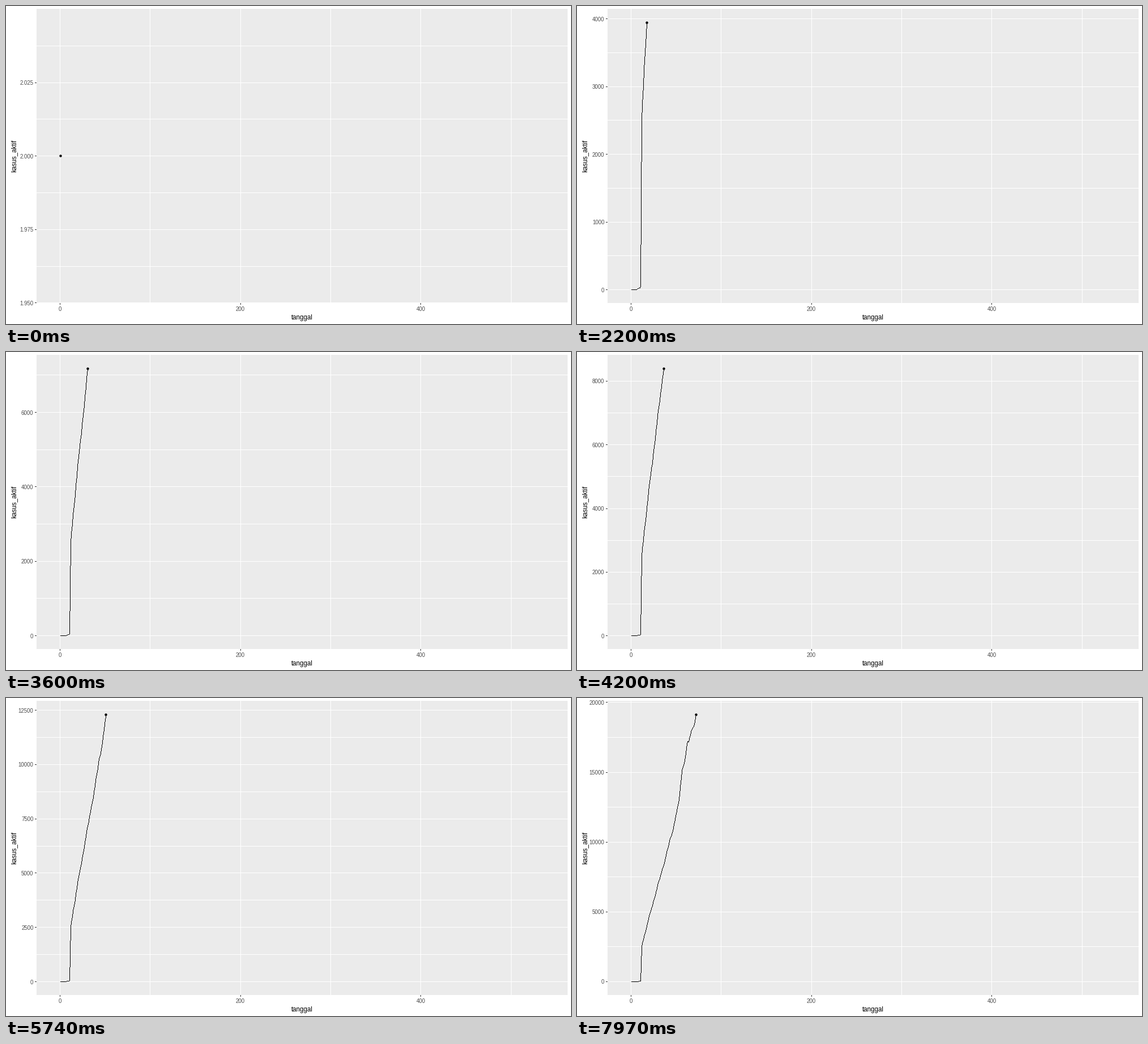
A matplotlib script that plays this animation: 998 by 561 pixels, repeating every 8000 ms.

```python
import math

import matplotlib.pyplot as plt
import numpy as np
from matplotlib.animation import FuncAnimation
from matplotlib.collections import LineCollection
from matplotlib.patches import Circle, Rectangle

W, H, DPI = 998, 561, 64
PX = 72 / DPI                                  # points per pixel
LEFT, RIGHT, TOP, BOTTOM = 54, 992.5, 5.5, 524
TICK_MS, LOOP_MS, HOLD_MS = 20, 8000, 500
LAST_DAY, STEPS = 536, 1679                    # full reveal covers all days

# Turning points of the curve as (day, cases)
TURNS = [(1, 2), (4, 2), (5, 4), (7, 6), (9, 27), (10, 27), (11, 60),
         (12, 2494), (16, 3509), (22, 5082), (24, 5423), (31, 7180),
         (37, 8471), (44, 10361), (45, 10393), (53, 12808), (57, 15145),
         (60, 15870), (63, 17204), (64, 17185), (68, 18129), (70, 18308),
         (73, 19246)]
DAYS = np.arange(1, TURNS[-1][0] + 1)
CASES = np.interp(DAYS, *zip(*TURNS))
KEYS = np.round((DAYS - 1) * STEPS / (LAST_DAY - 1))   # step of each day


def expand(lo, hi):
    pad = 0.05 * (hi - lo) if hi > lo else 0.05
    return lo - pad, hi + pad


def scaled(value, limits, start, end):
    lo, hi = limits
    return start + (value - lo) / (hi - lo) * (end - start)


def pixel(v):
    """Centre of the pixel that holds v."""
    return np.floor(v) + 0.5


def nice_breaks(lo, hi, m=5):
    """Extended Wilkinson labelling: first multiple, step and label count."""
    best, found = -9, None
    span = hi - lo
    for i, q in enumerate((1, 5, 2, 2.5, 4, 3)):
        for k in range(2, 11):
            z0 = math.ceil(math.log10(span / (k + 1) / q))
            for z in (z0, z0 + 1):
                step = q * 10.0 ** z
                first = math.floor(hi / step) - (k - 1)
                for start in range(first, math.ceil(lo / step) + 1):
                    a, b = start * step, (start + k - 1) * step
                    simple = (a <= 0 <= b) - i / 5
                    cover = 1 - 0.5 * ((hi - b) ** 2 + (lo - a) ** 2) / (0.1 * span) ** 2
                    ratio = (k - 1) / (b - a) * (max(b, hi) - min(a, lo)) / (m - 1)
                    dense = 2 - max(ratio, 1 / ratio)
                    score = 0.25 * simple + 0.2 * cover + 0.5 * dense + 0.05
                    if score > best + 1e-9:
                        best, found = score, (start, step, k)
    return found


def inside(values, lo, hi):
    eps = 1e-9 * max(1, abs(hi))
    return [v for v in values if lo - eps <= v < hi - eps]


def decimals(values):
    for n in range(6):
        if np.allclose(np.round(values, n), values, rtol=0, atol=1e-9):
            return n
    return 6


def pixel_run(xs, ys):
    """One-pixel strokes that trace a polyline without smoothing."""
    px, py = [], []
    for x0, y0, x1, y1 in zip(xs, ys, xs[1:], ys[1:]):
        n = int(max(abs(x1 - x0), abs(y1 - y0))) + 1
        px.append(np.linspace(x0, x1, n))
        py.append(np.linspace(y0, y1, n))
    if not px:
        return []
    x, y = pixel(np.concatenate(px)), pixel(np.concatenate(py))
    return np.stack([np.column_stack([x, y - 0.5]),
                     np.column_stack([x, y + 0.5])], axis=1)


plt.rcParams["font.family"] = "Liberation Sans"
fig = plt.figure(figsize=(W / DPI, H / DPI), dpi=DPI, facecolor="white")
ax = fig.add_axes([0, 0, 1, 1])
ax.set_xlim(0, W)
ax.set_ylim(H, 0)
ax.axis("off")

XLIM = expand(1, LAST_DAY)
EDGE, ROOF = math.floor(RIGHT), math.floor(TOP)


def x_px(day):
    return scaled(day, XLIM, LEFT, RIGHT)


def lines(color, z, segments=()):
    coll = LineCollection(segments, colors=color, linewidths=PX,
                          capstyle="butt", zorder=z)
    coll.set_snap(False)
    ax.add_collection(coll, autolim=False)
    return coll


def label(x, y, text, size=9.6, color="#4D4D4D", **kw):
    kw.setdefault("ha", "center")
    return ax.text(x, y, text, fontsize=size * PX, color=color, va="baseline", **kw)


ax.add_patch(Rectangle((LEFT, ROOF), EDGE - LEFT, BOTTOM - ROOF,
                       facecolor="#EBEBEB", linewidth=0, zorder=0))
columns = [pixel(x_px(d)) for d in range(0, 501, 100)]
lines("white", 1, [[(x, ROOF), (x, BOTTOM)] for x in columns])
lines("#333333", 3, [[(x, BOTTOM), (x, BOTTOM + 3)] for x in columns[::2]])
for day in (0, 200, 400):
    label(x_px(day), 538, str(day))
label((LEFT + RIGHT) / 2, 553, "tanggal", 11.5, "black")
label(17, (TOP + BOTTOM) / 2, "kasus_aktif", 11.5, "black",
      rotation=90, rotation_mode="anchor")

grid = lines("white", 1)
ticks = lines("#333333", 3)
curve = lines("black", 4)
dot = ax.add_patch(Circle((0, 0), 2.2, color="black", linewidth=0, zorder=5))
y_labels = [label(48.5, 0, "", ha="right") for _ in range(10)]


def draw(tick):
    t = tick * TICK_MS + TICK_MS / 2
    step = 0 if t < HOLD_MS else 1 + math.floor((t - HOLD_MS) * 0.03 + 1e-6)

    past = KEYS < step
    days = np.append(DAYS[past], np.interp(step, KEYS, DAYS))
    cases = np.append(CASES[past], np.interp(step, KEYS, CASES))
    ylim = expand(cases.min(), cases.max())

    def y_px(v):
        return scaled(v, ylim, BOTTOM, TOP)

    def rows(values, x0, x1):
        return [[(x0, y), (x1, y)] for y in map(pixel, map(y_px, values))]

    start, size, count = nice_breaks(*ylim)
    major = inside([(start + i) * size for i in range(count)], *ylim)
    minor = inside([(start + i - 0.5) * size for i in range(count + 1)], *ylim)
    grid.set_segments(rows(major + minor, LEFT, EDGE))
    ticks.set_segments(rows(major, LEFT - 3, LEFT))

    places = decimals(major)
    for i, text in enumerate(y_labels):
        text.set_visible(i < len(major))
        if i < len(major):
            text.set_text(f"{major[i]:.{places}f}")
            text.set_y(y_px(major[i]) + 4)

    xs, ys = pixel(x_px(days)), pixel(y_px(cases))
    curve.set_segments(pixel_run(xs, ys))
    dot.center = xs[-1], ys[-1]
    return grid, ticks, curve, dot, *y_labels


anim = FuncAnimation(fig, draw, frames=LOOP_MS // TICK_MS, interval=TICK_MS,
                     init_func=lambda: draw(0), repeat=True, repeat_delay=0)
plt.show()
```
